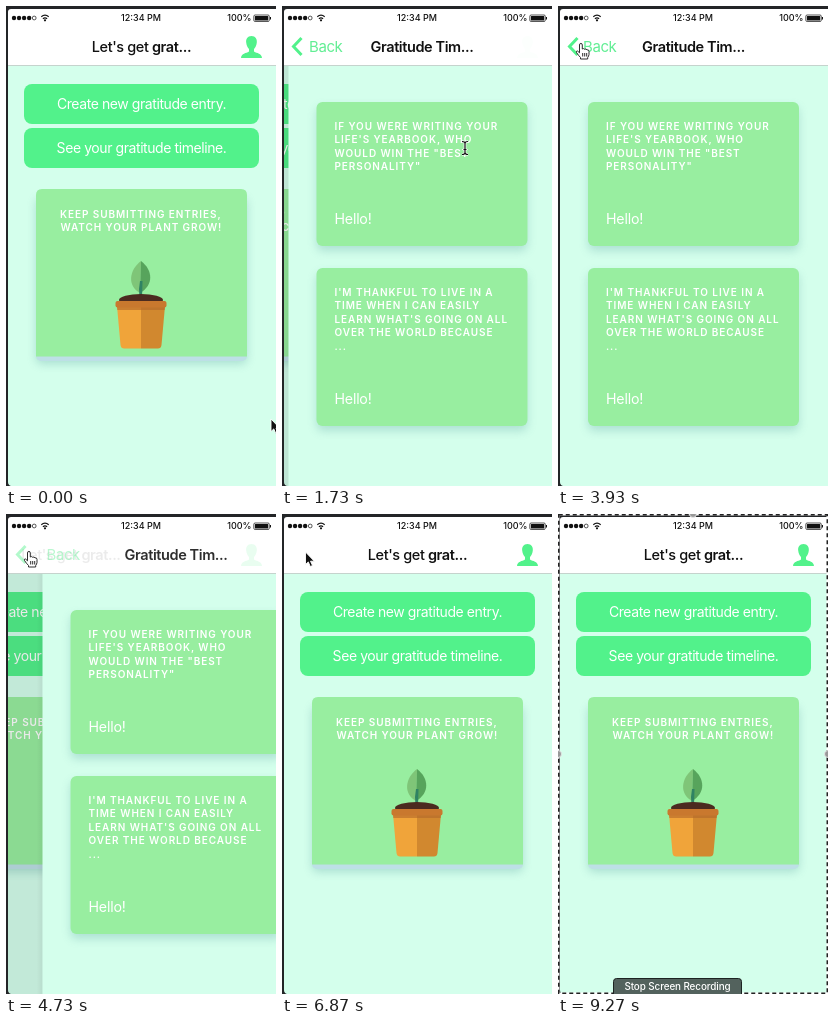
An HTML page that plays this animation: 270x480 px, repeating every 9.54 s.

```html
<!DOCTYPE html>
<html lang="en">
<head>
<meta charset="utf-8">
<title>Gratitude app</title>
<style>
html, body { margin: 0; width: 100%; height: 100%; overflow: hidden; background: #222; }
svg { display: block; width: 100vw; height: 100vh; }
text { font-family: Inter, "Liberation Sans", sans-serif; white-space: pre; }
.label { font-size: 14px; letter-spacing: -.42px; fill: #fff; text-anchor: middle; }
.caps { font-size: 10px; font-weight: 600; letter-spacing: .92px; fill: #fff; }
.hello { font-size: 14.2px; letter-spacing: -.2px; fill: #fff; }
.title { font-size: 14.5px; letter-spacing: -.4px; text-anchor: middle; fill: #111; font-weight: 600; }
.status { font-size: 9px; font-weight: 500; fill: #111; }
</style>
</head>
<body>
<svg viewBox="0 0 270 480" preserveAspectRatio="none">
  <defs>
    <filter id="soft" x="-20%" y="-20%" width="140%" height="150%"><feGaussianBlur stdDeviation="5"/></filter>
    <linearGradient id="edge"><stop offset="0" stop-color="#000" stop-opacity="0"/><stop offset="1" stop-color="#000" stop-opacity=".1"/></linearGradient>
  </defs>

  <g id="home">
    <rect x="2" y="59" width="350" height="421" fill="#d4ffec"/>
    <rect x="18" y="78" width="235" height="40" rx="8" fill="#52f28b"/>
    <text class="label" x="135.5" y="103">Create new gratitude entry.</text>
    <g id="press">
      <rect x="18" y="122" width="235" height="40" rx="8" fill="#52f28b"/>
      <text class="label" x="135.5" y="147">See your gratitude timeline.</text>
    </g>
    <rect x="30" y="192" width="211" height="166" rx="6" fill="#3c8c8c" opacity=".28" filter="url(#soft)"/>
    <rect x="30" y="190" width="211" height="165" rx="5" fill="#bde0e6"/>
    <path d="M30 350.500V189q0-6 6-6H235q6 0 6 6V350.500z" fill="#98eea0"/>
    <text class="caps" x="54" y="212">KEEP SUBMITTING ENTRIES,</text>
    <text class="caps" x="54.500" y="225">WATCH YOUR PLANT GROW!</text>
    <path d="M135 255C123 264 121 280 134 287z" fill="#7fc578"/>
    <path d="M135 255C147 264 148 279 134 287z" fill="#57a45c"/>
    <path d="M134 275L136.500 275L136 292H133.500L133 283z" fill="#2f8363"/>
    <ellipse cx="135" cy="294" rx="22" ry="6" fill="#4b2b20"/>
    <path d="M111 300H135V342.500H118Q115 342.500 114.500 339z" fill="#f0a43a"/>
    <path d="M135 300H159L155.500 339Q155 342.500 152 342.500H135z" fill="#d1882f"/>
    <path d="M111 301H159L158.700 304H111.300z" fill="#b2682a" opacity=".6"/>
    <rect x="109.500" y="295" width="51" height="6.500" rx="2" fill="#c9782e"/>
    <rect id="dim" x="2" y="59" width="350" height="421"/>
  </g>

  <g id="timeline">
    <rect id="pageEdge" x="-4" y="59" width="6" height="421" fill="url(#edge)"/>
    <rect x="2" y="59" width="268" height="421" fill="#d4ffec"/>
    <g id="cards"></g>
  </g>

  <rect width="270" height="59" fill="#fff"/>
  <rect y="59" width="270" height="1" fill="#c5d3cd"/>
  <g id="homeBar">
    <text class="title" x="135.500" y="45.500"><tspan font-weight="500">Let's get </tspan>grat...</text>
  </g>
  <path id="person" d="M245.500 30C241.500 30 239.800 33 240.200 36.500C240.500 39.500 241.500 41.500 243 43V45.500C240 47.500 235.500 47 235 52H256C255.500 47 251 47.500 248 45.500V43C249.500 41.500 250.500 39.500 250.800 36.500C251.200 33 249.500 30 245.500 30z" fill="#52f28b"/>
  <g id="back" fill="#62ee94">
    <path d="M19.500 32L11.500 40.500L19.500 49" fill="none" stroke="#52f28b" stroke-width="3"/>
    <text id="backText" x="25" y="45.500" font-size="15" letter-spacing="-.4">Back</text>
  </g>
  <text id="tlTitle" class="title" x="135.500" y="45.500">Gratitude Tim...</text>

  <g id="dots" fill="#111"></g>
  <g fill="none" stroke="#111" stroke-width="1.200">
    <path d="M35.300 10.800Q39 7.500 42.700 10.800M36.900 12.800Q39 11 41.100 12.800"/>
    <circle cx="39" cy="14.300" r=".5"/>
  </g>
  <text class="status" x="135" y="15.200" text-anchor="middle">12:34 PM</text>
  <text class="status" x="245.500" y="15.200" text-anchor="end">100%</text>
  <rect x="247.800" y="9" width="15.500" height="6.500" rx="1.300" fill="none" stroke="#111" stroke-width=".7"/>
  <rect x="248.900" y="10.100" width="13.300" height="4.300" rx=".5" fill="#111"/>
  <rect x="264" y="11" width="1" height="2.500" fill="#111"/>

  <path d="M0 0H270V3H5Q2 3 2 6V476Q2 479 5 480H0z" fill="#232527"/>

  <g id="frame">
    <rect x=".75" y=".75" width="268.500" height="478.500" fill="none" stroke="#fff" stroke-width="1.500"/>
    <rect x=".75" y=".75" width="268.500" height="478.500" fill="none" stroke="#222" stroke-width="1.500" stroke-dasharray="4 3"/>
    <g fill="#999" stroke="#eee" stroke-width=".8">
      <circle cx="135" cy="0" r="3.500"/><circle cx="0" cy="240" r="3.500"/><circle cx="270" cy="240" r="3.500"/>
    </g>
  </g>
  <g id="tip">
    <rect x="55.500" y="464.500" width="128" height="20" rx="3" fill="#53625d" stroke="#1d2422"/>
    <text x="119.500" y="475.500" text-anchor="middle" font-size="9.900" font-weight="500" letter-spacing="-.1" fill="#fff">Stop Screen Recording</text>
  </g>

  <g id="cursor" stroke-linejoin="round">
    <path id="arrow" d="M0 0V12.500L2.800 9.900L4.800 14.500L7 13.500L5 9.200H8.800z" fill="#111" stroke="#fff" stroke-width=".9"/>
    <g id="beam" fill="none">
      <path d="M-3 -6.500Q0 -6.500 0 -4.500Q0 -6.500 3 -6.500M0 -4.500V4.500M-3 6.500Q0 6.500 0 4.500Q0 6.500 3 6.500M-1.500 1.500H1.500" stroke="#fff" stroke-width="2.600"/>
      <path d="M-3 -6.500Q0 -6.500 0 -4.500Q0 -6.500 3 -6.500M0 -4.500V4.500M-3 6.500Q0 6.500 0 4.500Q0 6.500 3 6.500M-1.500 1.500H1.500" stroke="#111" stroke-width="1.200"/>
    </g>
    <path id="hand" d="M-2 1Q-2 -.6 -.6 -.6Q.8 -.6 .8 1V5Q2 4 3.200 5.300Q4.500 4.500 5.500 5.800Q7.500 5.500 7.500 7.500V10.500Q7.300 12 6.200 13.500V15H-1V13.500Q-3 11.500 -5 8.500Q-5.500 6.800 -4 7L-2 8.800zM1.200 9V12.500M3.200 9V12.500M5.200 9V12.500" fill="#fff" stroke="#222" stroke-width=".95"/>
  </g>
</svg>

<script>
const LOOP = 9540;
const $ = id => document.getElementById(id);
const clamp = v => Math.min(1, Math.max(0, v));
const ramp = (t, a, b) => clamp((t - a) / (b - a));
const show = (id, on) => $(id).setAttribute("display", on ? "inline" : "none");
const alpha = (id, v) => $(id).setAttribute("opacity", clamp(v).toFixed(3));
const shift = (id, x, y = 0) => $(id).setAttribute("transform", `translate(${x.toFixed(2)} ${y.toFixed(2)})`);

const entries = [
  { y: 96, h: 144, lines: ["IF YOU WERE WRITING YOUR", "LIFE'S YEARBOOK, WHO", "WOULD WIN THE \"BEST", "PERSONALITY\""] },
  { y: 262, h: 158, lines: ["I'M THANKFUL TO LIVE IN A", "TIME WHEN I CAN EASILY", "LEARN WHAT'S GOING ON ALL", "OVER THE WORLD BECAUSE", "..."] }
];

$("cards").innerHTML = entries.map(({ y, h, lines }) =>
  `<rect x="30" y="${y + 5}" width="211" height="${h}" rx="6" fill="#3c8c8c" opacity=".25" filter="url(#soft)"/>
   <rect x="30" y="${y}" width="211" height="${h}" rx="6" fill="#98eea0"/>` +
  lines.map((s, i) => `<text class="caps" x="48" y="${y + 28 + i * 13.4}">${s}</text>`).join("") +
  `<text class="hello" x="48" y="${y + h - 22}">Hello!</text>`
).join("");

$("dots").innerHTML = [0, 1, 2, 3, 4].map(i =>
  `<circle cx="${8 + i * 5.05}" cy="12" r="${i < 4 ? 2.2 : 1.9}"${i < 4 ? "" : ' fill="none" stroke="#111" stroke-width=".7"'}/>`
).join("");

// Critically damped spring, as in a navigation push
function spring(ms) {
  const x = Math.max(0, ms) * 0.01826;
  return 1 - (1 + x) * Math.exp(-x);
}

// Pointer stops: time, x, y
const stops = [
  [0, 265, 413], [70, 265, 413], [670, 183, 141], [2230, 183, 141],
  [3000, 190, 380], [3270, 190, 380], [3900, 23.500, 38], [7560, 23.500, 38], [8330, 112, 490], [LOOP, 112, 490]
];

function pointer(t) {
  const i = stops.findIndex((s, k) => k && t <= s[0]);
  const [a, x0, y0] = stops[i - 1], [b, x1, y1] = stops[i];
  const u = ramp(t, a, b), e = u * u * (3 - 2 * u);
  return [x0 + (x1 - x0) * e, y0 + (y1 - y0) * e];
}

function pointerKind(t, x, y) {
  if (t > 3600 && t < 5870 && y < 59) return "hand";
  const overText = entries.some(e => x > 48 && x < 224 && y > e.y + 18 && y < e.y + 20 + e.lines.length * 13.4);
  return t > 1500 && t < 4000 && overText ? "beam" : "arrow";
}

function draw(t) {
  const p = t < 3000 ? spring(t - 1400) : 1 - spring(t - 4697);
  shift("home", -81 * p);
  alpha("dim", p * 0.1);
  shift("timeline", 268 * (1 - p));
  show("timeline", p > 0.0005);
  alpha("pageEdge", (1 - p) * 4);

  shift("homeBar", -81 * p);
  alpha("homeBar", 1 - p * 1.15 + 0.08);
  alpha("person", 1 - p);
  shift("tlTitle", 268 * (1 - p));
  alpha("tlTitle", (p - 0.1) / 0.88);
  shift("backText", 120 * (1 - p));
  const held = ramp(t, 4470, 4560) * 0.5;
  alpha("back", (p - 0.1) / 0.88 * (1 - (t > 4000 ? held : 0)));
  alpha("press", 1 - 0.17 * (ramp(t, 1270, 1390) - ramp(t, 1420, 1700)));

  show("frame", t >= 8330);
  alpha("frame", ramp(t, 8300, 8470));
  show("tip", t >= 9270);

  const [x, y] = pointer(t), kind = pointerKind(t, x, y);
  shift("cursor", x, kind === "beam" ? y + 1 : y);
  for (const k of ["arrow", "beam", "hand"]) show(k, k === kind);
}

const start = performance.now();
function tick() {
  draw((performance.now() - start) % LOOP);
  requestAnimationFrame(tick);
}
draw(0);
requestAnimationFrame(tick);
</script>
</body>
</html>
```
